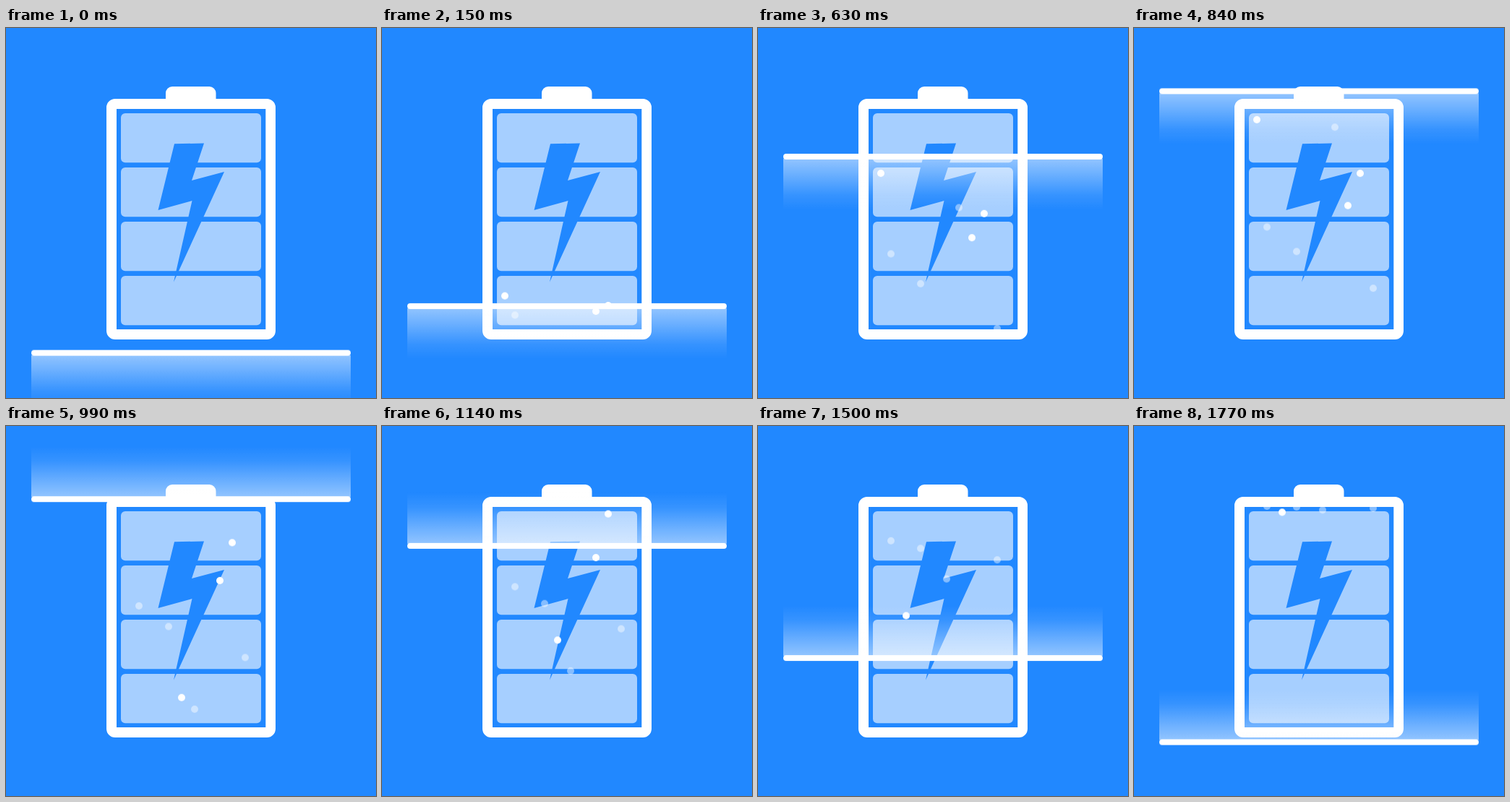
An HTML page without scripts for the animation above (1800 ms loop, 512 px wide and 512 px high).

```html
<!DOCTYPE html>
<html lang="en">
<head>
<meta charset="utf-8">
<title>Battery scan</title>
<style>
  html, body { margin: 0; width: 100%; height: 100%; overflow: hidden; background: #2188ff; }
  svg { display: block; width: 100%; height: 100%; }

  .scan { animation: sweep 1.8s linear infinite; }
  .glow { animation: flip 1.8s step-end infinite; }
  .bubbles circle {
    --rate: 1;
    --start: 0ms;
    r: 5px;
    fill: #fff;
    animation: rise 1.8s linear calc(var(--start) - 1.8s) infinite;
  }
  .bubbles .dim { fill-opacity: .45; }

  @keyframes sweep {
    0%, 100% { transform: translateY(450px); }
    50% { transform: translateY(62px); }
  }
  @keyframes flip {
    0% { transform: scaleY(1); }
    50%, 100% { transform: scaleY(-1); }
  }
  /* rate = trips per loop; the clip hides a bubble outside its own trip */
  @keyframes rise {
    from { transform: translateY(0); }
    to { transform: translateY(calc(-318px * var(--rate))); }
  }
</style>
</head>
<body>
<svg viewBox="0 0 512 512">
  <defs>
    <linearGradient id="fade" x1="0" y1="0" x2="0" y2="1">
      <stop offset="0" stop-color="#fff" stop-opacity=".51"/>
      <stop offset=".35" stop-color="#fff" stop-opacity=".31"/>
      <stop offset=".7" stop-color="#fff" stop-opacity=".1"/>
      <stop offset="1" stop-color="#fff" stop-opacity="0"/>
    </linearGradient>
    <clipPath id="inside"><rect x="153" y="112" width="206" height="305"/></clipPath>
    <rect id="cell" x="159" width="194" height="68.3" rx="6"/>
  </defs>

  <rect width="512" height="512" fill="#2188ff"/>

  <g fill="#fff">
    <path d="M221 99V90a9 9 0 0 1 9-9h51.500a9 9 0 0 1 9 9V99z"/>
    <path fill-rule="evenodd" d="M151 98H361a12 12 0 0 1 12 12V419a12 12 0 0 1-12 12H151a12 12 0 0 1-12-12V110a12 12 0 0 1 12-12zM153 112V417H359.300V112z"/>
    <g fill-opacity=".6">
      <use href="#cell" y="118"/>
      <use href="#cell" y="193"/>
      <use href="#cell" y="268"/>
      <use href="#cell" y="343"/>
    </g>
  </g>
  <path fill="#2188ff" d="M233 160.300L274 159.500L257 211L302 199L232 351.500L257.500 239L210.500 252z"/>

  <g class="bubbles" clip-path="url(#inside)">
    <circle cx="170" cy="424" style="--rate:2"/>
    <circle cx="296" cy="424" style="--rate:1.2"/>
    <circle cx="313" cy="424" style="--rate:1.5"/>
    <circle cx="243" cy="424" style="--rate:3;--start:900ms"/>
    <circle cx="205" cy="422" style="--rate:3;--start:1200ms"/>
    <circle class="dim" cx="184" cy="424"/>
    <circle class="dim" cx="278" cy="424" style="--rate:3;--start:300ms"/>
    <circle class="dim" cx="225" cy="424" style="--rate:1.2;--start:300ms"/>
    <circle class="dim" cx="331" cy="424" style="--rate:1.5;--start:600ms"/>
    <circle class="dim" cx="261" cy="424" style="--rate:2;--start:900ms"/>
  </g>

  <g class="scan">
    <rect class="glow" x="35" y="3" width="442" height="71" fill="url(#fade)"/>
    <rect x="35" y="-4" width="442" height="8" rx="4" fill="#fff"/>
  </g>
</svg>
</body>
</html>
```
